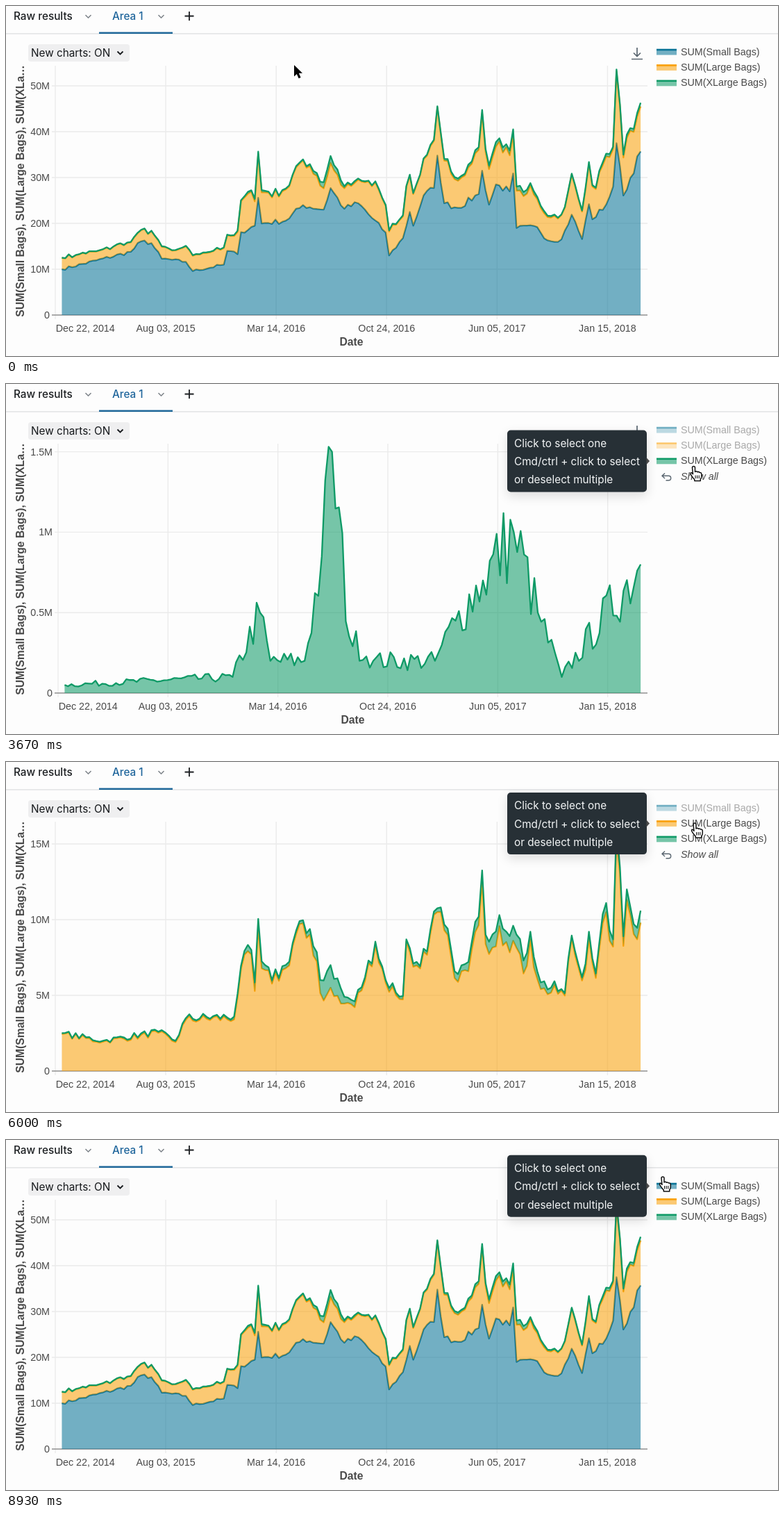
Write an HTML page with a canvas that moves like this. It is 1112 px wide and 504 px high and loops after 8.99 s.

```html
<!DOCTYPE html>
<html lang="en">
<head>
<meta charset="utf-8">
<title>Area chart legend</title>
<style>
html, body { margin: 0; width: 100%; height: 100%; overflow: hidden; background: #fdfdfd; }
canvas { display: block; }
</style>
</head>
<body>
<canvas id="stage" width="1112" height="504"></canvas>
<script>
const ctx = document.getElementById('stage').getContext('2d');
const LOOP = 8990, WEEKS = 169;
const UI = '15.3px Inter, sans-serif';
const UI_MEDIUM = '500 ' + UI;
const LABEL = '14.3px "Liberation Sans", Arial, sans-serif';
const TITLE = 'bold 15.7px "Liberation Sans", Arial, sans-serif';

let seed = 7;
const random = () => (seed = seed * 16807 % 2147483647) / 2147483647;

// Joins { week: millions } turning points; the weeks between get relative noise.
function weekly(points, noise) {
  const keys = Object.keys(points).map(Number);
  return Array.from({ length: WEEKS }, (_, week) => {
    const i = keys.findIndex(k => k >= week), a = keys[i - 1], b = keys[i];
    if (b === week) return points[b];
    const v = points[a] + (points[b] - points[a]) * (week - a) / (b - a);
    return v * (1 + noise * (random() * 2 - 1));
  });
}

const small = weekly({
  0: 10, 20: 13.8, 23: 16.1, 26: 15.7, 29: 12.3, 36: 11.6, 38: 9.6, 47: 11, 48: 14, 51: 13.3,
  52: 18.1, 56: 19.5, 57: 25.6, 58: 20, 65: 20.6, 70: 24, 76: 23, 78: 27.7, 82: 23.2, 86: 24.4,
  94: 18, 95: 13, 99: 16.8, 101: 22.5, 102: 19.5, 105: 26.1, 108: 27.7, 109: 34.8, 111: 24.4,
  115: 23.4, 121: 26.4, 122: 31.5, 124: 24.1, 126: 28.5, 130: 27, 131: 30.9, 132: 19, 138: 19.2,
  141: 16.3, 145: 16.5, 148: 21.9, 151: 16.6, 153: 24.2, 154: 20.9, 158: 24.1, 160: 28,
  161: 37.5, 163: 26.1, 168: 35.7
}, .03);
const upper = weekly({
  0: 2.5, 12: 2, 28: 2.6, 33: 2, 36: 3.5, 50: 3.6, 52: 6.95, 55: 8, 56: 5.85, 57: 10.05, 58: 7.25,
  61: 6, 65: 7, 69: 9.9, 71: 9.1, 74: 7.85, 75: 6, 78: 7, 82: 4.9, 85: 4.6, 88: 6.2, 91: 8.55,
  94: 6, 99: 4.95, 100: 8.7, 102: 7.1, 106: 7.9, 109: 10.75, 113: 8, 115: 6.4, 118: 7.2,
  121: 10.2, 122: 13.25, 123: 9, 127: 10.3, 131: 9.6, 134: 7.3, 136: 9.2, 139: 5.85, 146: 5.15,
  148: 8.95, 151: 6.2, 153: 9.2, 155: 6.45, 158: 11.1, 160: 8.7, 161: 16.1, 163: 8.9, 164: 12,
  166: 9.7, 168: 10.6
}, .09);
const xlarge = weekly({
  0: .05, 49: .1, 57: .5, 60: .2, 70: .2, 75: .85, 78: 1.5, 83: .35, 90: .2, 108: .2, 114: .45,
  122: .7, 131: 1, 138: .5, 145: .1, 168: .8
}, .3);
const SERIES = [
  { name: 'Small', rgb: '7,115,150', data: small },
  { name: 'Large', rgb: '250,160,8', data: upper.map((v, i) => v - xlarge[i]) },
  { name: 'XLarge', rgb: '14,154,102', data: xlarge }
];
const SMALL = 1, LARGE = 2, XLARGE = 4, ALL = 7;
const VIEWS = {
  [ALL]: { top: 54.4, step: 10, left: 71 },
  [SMALL]: { top: 37.9, step: 10, left: 71 },
  [LARGE]: { top: 16, step: 5, left: 71 },
  [XLARGE]: { top: 1.55, step: .5, left: 75 },
  [LARGE | XLARGE]: { top: 16.47, step: 5, left: 71 },
  0: { left: 15 }
};
const RIGHT = 924, TOP = 86, BASE = 445;
const DATES = ['Dec 22, 2014', 'Aug 03, 2015', 'Mar 14, 2016', 'Oct 24, 2016', 'Jun 05, 2017', 'Jan 15, 2018'];
const rowY = row => 65.5 + row * 22.4;
const rowAt = y => Math.max(0, Math.round((y - rowY(0)) / 22.4));
const SHOW_ALL = 3;

// Pointer visits: hover from `over`, click at `click`, which leaves the series in `show`.
const VISITS = [
  { over: 1420, x: 984, y: 62, click: 2400, show: SMALL },
  { over: 2640, x: 993, y: 88, click: 3150, show: LARGE },
  { over: 3300, x: 994, y: 111, click: 3560, show: XLARGE },
  { over: 3720, x: 985, y: 130, click: 4250, show: ALL },
  { over: 4880, x: 988, y: 62, click: 5720, show: LARGE | XLARGE },
  { over: 5850, x: 992, y: 88, click: 6380, show: XLARGE },
  { over: 6500, x: 994, y: 111, click: 6640, show: 0 },
  { over: 7450, x: 985, y: 130, click: 7650, show: ALL },
  { over: 8300, x: 946, y: 53, click: LOOP, show: ALL }
];

const ARROW = new Path2D('M0 0V16.5l3.8-3.6 2.8 6.3 3-1.3-2.8-6.2h5.2z');
const HAND = new Path2D('M-2 2q0-2 2-2t2 2v6q2-1.5 3.5.3q2-1 3.2.8q2.5-.5 2.6 2v3.5q0 2.5-1.5 4v2.5h-8.5v-2' +
  'q-3-3-5.5-7.5q-.8-2.5 1-2.3q1 .2 2.2 2z');
const FINGERS = new Path2D('M2.6 13v4.5M5.2 13v4.5M7.8 13v4.5');

function text(str, x, y, font, color, align = 'left') {
  ctx.font = font;
  ctx.fillStyle = color;
  ctx.textAlign = align;
  ctx.fillText(str, x, y);
}

function stroke(path, color, width) {
  ctx.strokeStyle = color;
  ctx.lineWidth = width;
  ctx.stroke(typeof path === 'string' ? new Path2D(path) : path);
}

function box(x, y, w, h, r, color) {
  ctx.fillStyle = color;
  ctx.beginPath();
  ctx.roundRect(x, y, w, h, r);
  ctx.fill();
}

const chevron = (x, y, color, width) => stroke(`M${x - 4} ${y - 2}l4 4 4-4`, color, width);

function drawHeader() {
  text('Raw results', 11, 20.2, UI_MEDIUM, '#1c1f22');
  text('Area 1', 153, 20.2, UI_MEDIUM, '#20669c');
  chevron(118.5, 15, '#7b8187', 1.5);
  chevron(223.5, 15, '#7b8187', 1.5);
  stroke('M257.5 14.5h13M264 8v13', '#1c1f22', 1.8);
  stroke('M0 39.8H1112', '#dcdee0', 1.3);
  stroke('M134 38.8H240', '#20699a', 2.5);
  box(32, 55, 146, 25, 4, '#efeff0');
  text('New charts: ON', 36, 72.5, UI, '#16191c');
  chevron(164.5, 67.5, '#16191c', 1.8);
  stroke('M909 60v12.5m-5-5l5 5 5-5M901 76.5h16', '#5a6670', 1.7);
}

function drawChart(mask) {
  const { left, top, step } = VIEWS[mask], width = RIGHT - left;
  const y = v => BASE - v / top * (BASE - TOP);

  DATES.forEach((date, i) => {
    const x = left + width * .1865 * i;
    stroke(`M${x} ${TOP}V${mask ? 451 : 455}`, '#ebebeb', 1.4);
    const day = String(+date.slice(4, 6) + 1).padStart(2, '0');
    const label = mask ? date : date.slice(0, 4) + day + date.slice(6);
    text(label, i ? x : x + .7, 469, LABEL, '#4a4a4a', i ? 'center' : 'left');
  });
  text('Date', (left + RIGHT) / 2, 488.5, TITLE, '#4a4a4a', 'center');
  if (!mask) return;

  for (let v = 0; v < top; v += step) {
    if (v) stroke(`M${left - 5} ${y(v)}H${RIGHT}`, '#ebebeb', 1.4);
    text(v ? v + 'M' : '0', left - 8, y(v) + 5, LABEL, '#4a4a4a', 'right');
  }
  stroke(`M${left - 5} ${BASE}H${RIGHT}`, '#909090', 1.4);

  ctx.save();
  ctx.translate(26.3, 266.5);
  ctx.rotate(-Math.PI / 2);
  text('SUM(Small Bags), SUM(Large Bags), SUM(XLa…', 0, 0, TITLE, '#4a4a4a', 'center');
  ctx.restore();

  const point = (v, i) => `${left + width * (.0111 + .9773 * i / (WEEKS - 1))} ${y(v)}`;
  let floor = Array(WEEKS).fill(0);
  ctx.lineJoin = 'round';
  SERIES.forEach(({ rgb, data }, s) => {
    if (!(mask & 1 << s)) return;
    const sum = floor.map((v, i) => v + data[i]);
    const line = 'M' + sum.map(point).join('L');
    ctx.fillStyle = `rgba(${rgb},.56)`;
    ctx.fill(new Path2D(line + 'L' + floor.map(point).reverse().join('L') + 'z'));
    stroke(line, `rgb(${rgb})`, 2.3);
    floor = sum;
  });
  ctx.lineJoin = 'miter';
}

function drawLegend(mask) {
  SERIES.forEach(({ name, rgb }, s) => {
    const y = rowY(s);
    ctx.globalAlpha = mask & 1 << s ? 1 : .47;
    box(937, y - 3, 29, 8, 0, `rgba(${rgb},.56)`);
    stroke(`M937 ${y - 2.5}h29`, `rgb(${rgb})`, 2.6);
    text(`SUM(${name} Bags)`, 972, y + 5, LABEL, '#4a4a4a');
  });
  ctx.globalAlpha = 1;
  if (mask === ALL) return;
  text('Show all', 972, 138, 'italic ' + LABEL, '#4a4a4a');
  stroke('M949 128.5l-4 3.8 4 3.8M945 132.3h9.5a3.2 3.2 0 0 1 0 6.4h-4', '#5a6670', 1.4);
}

function drawTooltip(row, age) {
  const p = Math.min(1, age / 120), scale = .75 + .25 * p;
  ctx.save();
  ctx.globalAlpha = p;
  ctx.translate(927, rowY(row) + .7);
  ctx.scale(scale, scale);
  ctx.save();
  ctx.shadowColor = 'rgba(0,0,0,.13)';
  ctx.shadowBlur = 16;
  ctx.shadowOffsetY = 6;
  box(-205, -44.5, 201, 89, 5, '#273036');
  ctx.restore();
  ctx.fill(new Path2D('M-4.5-5L0 0l-4.5 5z'));
  ['Click to select one', 'Cmd/ctrl + click to select', 'or deselect multiple'].forEach((line, i) =>
    text(line, -195, -20.5 + i * 26.4, UI, '#f3f5f6'));
  ctx.restore();
}

function pointerAt(t) {
  let x = 415, y = 85, left = 0;
  for (const v of VISITS) {
    const from = Math.max(left, v.over - 500), to = v.over + 100;
    const u = Math.min(1, Math.max(0, (t - from) / (to - from))), e = u * u * (3 - 2 * u);
    x += (v.x - x) * e;
    y += (v.y - y) * e;
    if (u < 1) break;
    left = v.click;
  }
  return [x, y];
}

function drawPointer(t, hand) {
  ctx.save();
  ctx.translate(...pointerAt(t));
  ctx.lineJoin = 'round';
  if (hand) {
    ctx.fillStyle = '#fff';
    ctx.fill(HAND);
    stroke(HAND, '#111', 1.5);
    stroke(FINGERS, '#111', 1.1);
  } else {
    stroke(ARROW, '#fff', 2.6);
    ctx.fillStyle = '#000';
    ctx.fill(ARROW);
  }
  ctx.restore();
}

function draw(t) {
  const mask = VISITS.findLast(v => v.click <= t)?.show ?? ALL;
  const visit = VISITS.findLast(v => v.over <= t);
  const row = visit && rowAt(visit.y);
  // The "Show all" entry vanishes under the pointer once clicked.
  const hovering = visit && !(row === SHOW_ALL && t >= visit.click);
  ctx.fillStyle = '#fdfdfd';
  ctx.fillRect(0, 0, 1112, 504);
  drawHeader();
  drawChart(mask);
  drawLegend(mask);
  if (hovering && row < SHOW_ALL) drawTooltip(row, t - visit.over);
  drawPointer(t, hovering);
}

const start = performance.now();
function tick() {
  draw((performance.now() - start) % LOOP);
  requestAnimationFrame(tick);
}
tick();
</script>
</body>
</html>
```
